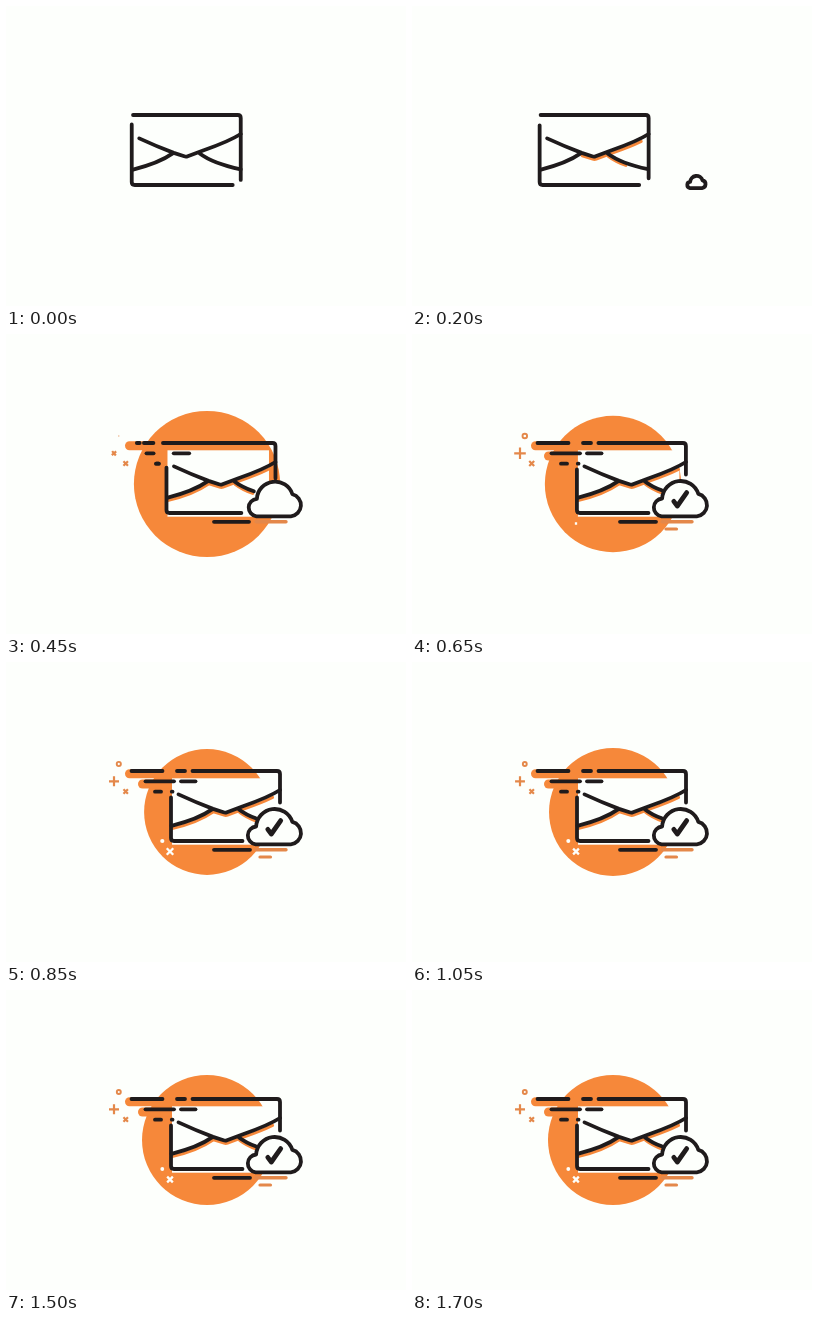
Write an HTML page with a canvas that moves like this. It is 400 px wide and 300 px high and loops after 1.75 s.

```html
<!DOCTYPE html>
<html lang="en">
<head>
<meta charset="utf-8">
<title>Mail sent</title>
<style>
  html, body { margin: 0; width: 100%; height: 100%; overflow: hidden; background: #fdfffc; }
  canvas { display: block; width: 400px; height: 300px; }
</style>
</head>
<body>
<canvas id="stage" width="400" height="300"></canvas>
<script>
const ctx = document.getElementById('stage').getContext('2d');
const LOOP = 1750, STEP = 50;
const PAPER = '#fdfffc', INK = '#1f1b1c', ORANGE = '#f6883a', SPARK = '#e4884a';
const LINE = 3.8;

const flap = new Path2D('M172.5 132.4 Q190 140.5 207 146.9 L217.5 150.3 Q219.3 150.9 221 150.2 L237 144.2 Q262 135.6 274 128');
const flapShade = new Path2D('M207 146.9 L217.5 150.3 Q219.3 150.9 221 150.2 L237 144.2 Q255 138.1 266 132.6');
const foldLeft = new Path2D('M165.5 163.8 Q192 157.3 206 147.4');
const foldRight = new Path2D('M233 147.4 Q246 157.3 274 163.3');
const cloud = new Path2D('M250 182 A8.8 8.8 0 0 1 250.5 164.5 A18.2 18.2 0 0 1 286 160 A11.2 11.2 0 0 1 284.5 182 Z');
const tick = new Path2D('M261.8 167.4 L265.3 172 L274.7 158.6');

// Dashes behind the envelope: row, ends while it arrives, ends at rest
const ROWS = [109, 119.3, 129.7, 187.8];
const dashes = [
  [0, [131, 133], [125.5, 156.5]],
  [0, [137, 146.5], [171, 179]],
  [1, [140.5, 147], [139.5, 168]],
  [1, [167.5, 183], [175, 189.5]],
  [2, [150, 152.5], [149, 155]],
  [2, [150, 152.5], [165.8, 166.5]],
  [3, [208, 243], [208, 244]],
];

const mix = (a, b, p) => a + (b - a) * p;
const span = (t, start, length) => Math.min(1, Math.max(0, (t - start) / length));

function ease(t, start, length) {
  const u = span(t, start, length);
  return u * u * (3 - 2 * u);
}

// Damped overshoot from 0 to 1
function spring(t, start) {
  const x = Math.max(0, t - start);
  return 1 - Math.exp(-0.0063 * x) * Math.cos(0.0098 * x);
}

const travel = t => 1 / (1 + Math.exp((348 - t) / 50));
const slide = t => ease(t, 430, 200);

function stroke(path, color, width = LINE, shown = Infinity) {
  if (shown <= 0) return;
  ctx.strokeStyle = color;
  ctx.lineWidth = width;
  ctx.setLineDash(shown < Infinity ? [shown, 999] : []);
  ctx.stroke(path);
  ctx.setLineDash([]);
}

function bar(x0, x1, y, color = INK, width = LINE) {
  if (x1 > x0) stroke(new Path2D(`M${x0} ${y}H${x1}`), color, width);
}

function disc(x, y, r, color) {
  ctx.fillStyle = color;
  ctx.beginPath();
  ctx.arc(x, y, Math.max(0, r), 0, Math.PI * 2);
  ctx.fill();
}

function cross(x, y, half, turn, color, width = 2.2) {
  if (half <= 0) return;
  ctx.save();
  ctx.translate(x, y);
  ctx.rotate(turn);
  ctx.lineCap = 'butt';
  stroke(new Path2D(`M${-half} 0H${half}M0 ${-half}V${half}`), color, width);
  ctx.restore();
}

function drawBackdrop(t) {
  const dip = 1.1 * Math.sin(Math.PI * span(t, 700, 600));
  disc(201, 150, 65 * spring(t, 240) - dip, ORANGE);
  bar(mix(160, 123.5, ease(t, 330, 120)), 160, 111.8, ORANGE, 9);
  bar(mix(164, 136.5, ease(t, 450, 150)), 164, 122, ORANGE, 9);
}

function drawEnvelope(t) {
  const p = travel(t);
  const foldLength = mix(45, 19, p);
  const shade = span(t, 100, 100);

  ctx.save();
  ctx.translate(mix(-39.3, 0, p), 0);
  ctx.fillStyle = PAPER;
  ctx.fillRect(166, 116.3, 101.5, 66.4);

  ctx.save();
  ctx.translate(0.6, 2.8);
  stroke(flapShade, ORANGE, 3, 64 * shade);
  stroke(foldRight, ORANGE, 3, Math.min(foldLength, 20 * shade));
  stroke(foldLeft, ORANGE, 3, 46 * span(t, 200, 150));
  ctx.restore();

  stroke(new Path2D(`M165 ${mix(118.5, 135.5, p)}V176Q165 179 168 179H${mix(266, 236.5, p)}`), INK);
  stroke(new Path2D(`M262 109H271Q274 109 274 112V${mix(174, 140.5, p)}`), INK);
  stroke(flap, INK);
  stroke(foldLeft, INK);
  stroke(foldRight, INK, LINE, foldLength);
  ctx.restore();

  bar(mix(127, 160, p) + 26.5 * slide(t), mix(224, 263, p), 109);
}

function drawSpeedLines(t) {
  const s = slide(t);
  dashes.forEach(([row, [a, b], [c, d]], i) => {
    const grow = span(t, 250 + 15 * i, 100);
    const x = mix(a, c, s);
    bar(x, mix(x, mix(b, d, s), grow), ROWS[row]);
  });
  bar(250, mix(250, 280, ease(t, 300, 150)), 187.8, SPARK, 3.4);
  bar(254, mix(254, 264.5, ease(t, 500, 100)), 195, SPARK, 3.2);
}

function drawCloud(t) {
  const size = 1.02 * (1 - (1 - span(t, 130, 370)) ** 2);
  if (size <= 0) return;
  const move = ease(t, 150, 330);
  const x = mix(285.5, 268.5, move), y = mix(176.7, 164.5, move);
  const path = new Path2D();
  path.addPath(cloud, new DOMMatrix([size, 0, 0, size, x - 268.5 * size, y - 164.5 * size]));
  ctx.fillStyle = PAPER;
  ctx.fill(path);
  stroke(path, INK);
  stroke(tick, INK, 4.8, 23 * span(t, 460, 140));
}

function drawSparks(t) {
  const q = Math.PI / 4;
  cross(108, 119.3, 5 * spring(t, 370), 1.5 * q * (1 - ease(t, 400, 150)), SPARK);
  cross(119.7, 129.5, 3.2 * spring(t, 290), q, SPARK);

  const ring = 2 * spring(t, 430);
  if (ring > 0) {
    const path = new Path2D();
    path.arc(112.8, 102, ring, 0, Math.PI * 2);
    stroke(path, SPARK, Math.min(1.9, ring * 2));
  }

  cross(164, 189.5, 4 * spring(t, 610), q * ease(t, 650, 150), PAPER, 2.3);
  disc(156.3, 179, 1.9 * spring(t, 650), PAPER);
}

function draw(now) {
  const t = Math.floor((now % LOOP) / STEP) * STEP;
  ctx.fillStyle = PAPER;
  ctx.fillRect(0, 0, 400, 300);
  ctx.lineCap = ctx.lineJoin = 'round';
  drawBackdrop(t);
  drawEnvelope(t);
  drawSpeedLines(t);
  drawCloud(t);
  drawSparks(t);
}

const start = performance.now();
function frame() {
  draw(performance.now() - start);
  requestAnimationFrame(frame);
}
frame();
</script>
</body>
</html>
```
